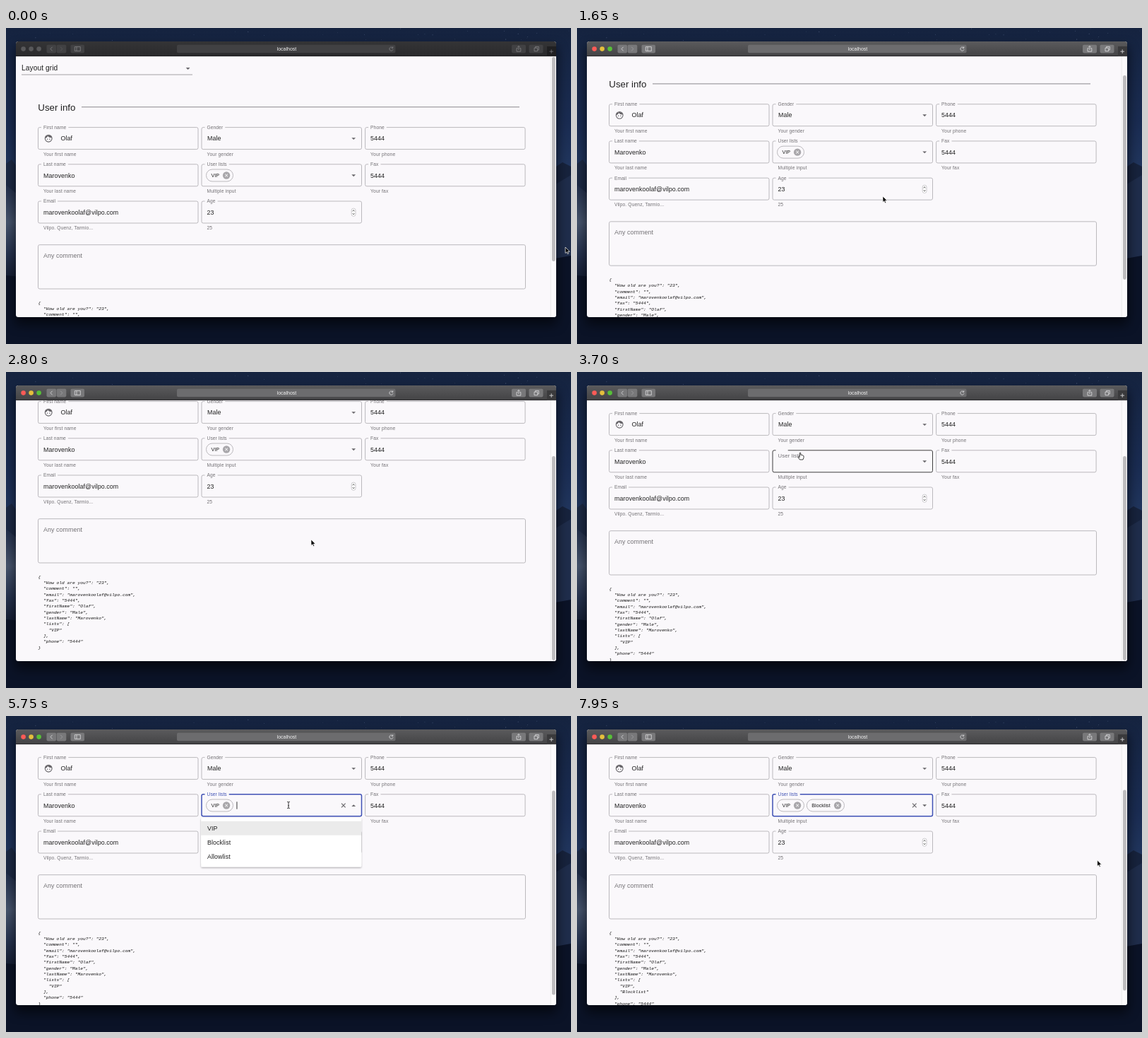
Animation, 800 px wide and 447 px high, one loop 8 s. Source, as an HTML page:

```html
<!DOCTYPE html>
<html lang="en">
<head>
<meta charset="utf-8">
<title>User info form</title>
<style>
html, body { margin: 0; width: 100%; height: 100%; overflow: hidden; background: #0d1730; }
svg { display: block; width: 100vw; height: 100vh; font-family: "Liberation Sans", Arial, sans-serif; }
text { white-space: pre; }
.val { font-size: 8.86px; letter-spacing: .083px; fill: #202020; }
.ph { font-size: 8.86px; letter-spacing: .083px; fill: #737175; }
.lab { font-size: 6.64px; letter-spacing: .1px; fill: #737175; }
.help { font-size: 6.64px; letter-spacing: .15px; fill: #737175; }
.chip { font-size: 7.2px; fill: #202020; }
.code { font: italic 6.23px "Liberation Mono", "Courier New", monospace; fill: #111; }
.box { fill: none; stroke: #b4b2b6; stroke-width: .9; }
.ico { fill: none; stroke: #d5d5d7; stroke-width: .9; }
</style>
</head>
<body>
<svg id="stage" viewBox="0 0 800 447">
  <defs>
    <linearGradient id="sky" x2="0" y2="1">
      <stop offset="0" stop-color="#15233f"/><stop offset=".3" stop-color="#1a2c52"/>
      <stop offset=".5" stop-color="#243a63"/><stop offset=".8" stop-color="#0f1830"/>
      <stop offset="1" stop-color="#0a1122"/>
    </linearGradient>
    <linearGradient id="dune" x2="0" y2="1">
      <stop offset="0" stop-color="#222f4b"/><stop offset=".35" stop-color="#48566f"/>
      <stop offset=".65" stop-color="#26334f"/><stop offset="1" stop-color="#0b1326"/>
    </linearGradient>
    <linearGradient id="barOff" x2="0" y2="1">
      <stop offset="0" stop-color="#343436"/><stop offset="1" stop-color="#2a2a2c"/>
    </linearGradient>
    <linearGradient id="barOn" x2="0" y2="1">
      <stop offset="0" stop-color="#5b5b5d"/><stop offset="1" stop-color="#434345"/>
    </linearGradient>
    <filter id="soft" x="-10%" y="-10%" width="120%" height="125%"><feGaussianBlur stdDeviation="8"/></filter>
    <filter id="lift" x="-10%" y="-10%" width="120%" height="130%">
      <feDropShadow dx="0" dy="1.2" stdDeviation="1.3" flood-opacity=".35"/>
    </filter>
    <clipPath id="win"><rect x="14" y="19" width="765" height="390" rx="3.5"/></clipPath>
    <clipPath id="view"><rect x="14" y="40" width="757" height="369"/></clipPath>
  </defs>

  <rect width="800" height="447" fill="url(#sky)"/>
  <g id="stars" fill="#8fa2c8"></g>
  <path d="M0 192L8 186 22 206V447H0Z" fill="#1d2a45"/>
  <path d="M0 222L22 240V372H0Z" fill="url(#dune)"/>
  <path d="M800 196L788 190 770 202V447H800Z" fill="#17233d"/>
  <path d="M770 226L800 208V330H770Z" fill="#1f2d4b"/>
  <path d="M0 350Q400 395 800 322V447H0Z" fill="#0b1327"/>
  <rect x="12" y="26" width="769" height="394" rx="6" fill="#000" opacity=".55" filter="url(#soft)"/>

  <g clip-path="url(#win)">
    <rect x="14" y="19" width="765" height="390" fill="#faf8fb"/>
    <g clip-path="url(#view)"><g id="page"></g></g>
    <rect x="771" y="40" width="8" height="369" fill="#fbfafb"/>
    <path d="M771.3 40V409" stroke="#e6e5e7" stroke-width=".7"/>
    <rect id="thumb" x="773" width="4.8" rx="2.4" fill="#bdbcbe"/>
    <rect id="bar" x="14" y="19" width="765" height="21"/>
    <path d="M14 39.7H779" stroke="#161617" stroke-width=".7"/>
    <rect id="addr" x="242" y="23.8" width="309.5" height="11.4" rx="2"/>
    <text x="397.5" y="32.2" text-anchor="middle" font-size="7" fill="#f1f1f1">localhost</text>
    <g id="lights"></g>
    <g id="tools"></g>
  </g>
  <g id="cursor"></g>
</svg>
<script>
const NS = "http://www.w3.org/2000/svg";
const $ = id => document.getElementById(id);
function add(parent, tag, attrs, text) {
  const e = document.createElementNS(NS, tag);
  for (const k in attrs) e.setAttribute(k, attrs[k]);
  if (text !== undefined) e.textContent = text;
  parent.appendChild(e);
  return e;
}
const set = (e, attrs) => { for (const k in attrs) e.setAttribute(k, attrs[k]); };
const show = (e, on) => e.setAttribute("display", on ? "inline" : "none");
const clamp = u => Math.max(0, Math.min(1, u));
const smooth = u => u * u * (3 - 2 * u);
const easeOut = u => 1 - (1 - u) ** 3;
const lerp = (a, b, u) => a + (b - a) * u;

// Event times in ms
const LOOP = 8000, FOCUS = 1350, CLEAR = 3660, CLEAR_JSON = 3750,
  OPEN1 = 4300, PICK1 = 5250, OPEN2 = 5750, PICK2 = 6300;
const BG = "#faf8fb", BLUE = "#3f51b5", VIEW = 367, LINE = 8.33;

// ---- window chrome
let seed = 7;
const rnd = () => (seed = seed * 16807 % 2147483647) / 2147483647;
for (let i = 0; i < 34; i++)
  add($("stars"), "circle", { cx: rnd() * 800, cy: rnd() * 18, r: .3 + rnd() * .3, opacity: .2 + rnd() * .4 });

const lights = ["#fc5b57", "#e5bf3c", "#57c038"].map((c, i) =>
  [add($("lights"), "circle", { cx: 24.6 + 11 * i, cy: 29.6, r: 3.3 }), c]);
const buttons = [[57.5, 13.6], [71.7, 13.6], [91.5, 19.5], [716, 20], [740.5, 20]].map(([x, width]) =>
  add($("tools"), "rect", { x, y: 23.8, width, height: 11.6, rx: 1.8 }));
const plusBox = add($("tools"), "rect", { x: 766, y: 26, width: 13, height: 14 });
const icons = add($("tools"), "g", {});
const ico = (d, extra) => add(icons, "path", { d, class: "ico", ...extra });
ico("M65.6 26.8L63 29.6L65.6 32.4");
ico("M77.2 26.8L79.8 29.6L77.2 32.4", { opacity: .4 });
ico("M97.3 26.6H105.3V32.6H97.3ZM100 26.6V32.6");
ico("M724.5 28.6H723V33.2H728.8V28.6H727.3M725.9 31V25.6M724.3 27L725.9 25.4L727.5 27", { "stroke-width": .8 });
ico("M748 28.2H752.6V32.8H748ZM749.6 28V26.4H754.3V31H752.8", { "stroke-width": .8 });
ico("M769.4 33.2H775M772.2 30.4V36");
ico("M547.6 28.1A2.6 2.6 0 1 0 548 30.3M547.8 26.3V28.4H545.7", { "stroke-width": .75 });

// ---- page, laid out at scroll 0
const page = $("page");
const text = (x, y, cls, s, parent = page) => add(parent, "text", { x, y, class: cls }, s);
const arrow = (x, y, parent = page) =>
  add(parent, "path", { d: "M-2.9 -1.4H2.9L0 1.5Z", fill: "#6a686c", transform: `translate(${x} ${y})` });

text(22, 60, "val", "Layout grid").style.fontSize = "10.2px";
arrow(257.6, 57.4);
add(page, "path", { d: "M22 66H264", stroke: "#8d8b8f", "stroke-width": .8 });
text(45.3, 116.6, "val", "User info").style.cssText = "font-size:13.27px;letter-spacing:0";
add(page, "path", { d: "M107 111.8H727", stroke: "#7d7b7f", "stroke-width": .9 });

const COLS = [45.5, 277, 508.6], W = 226.5, H = 31;
const rowY = r => 140.6 + 52.2 * r;
const fields = [];
function field(col, row, label, help, value, dx = 7.5) {
  const x = COLS[col], y = rowY(row);
  const rect = add(page, "rect", { x, y, width: W, height: H, rx: 2.2, class: "box" });
  const gap = add(page, "rect", { x: x + 4.5, y: y - 1.2, height: 2.6, fill: BG });
  const lab = text(0, 0, "lab", label);
  set(lab, { transform: `translate(${x + 7.5} ${y + 2.4})` });
  const gapW = lab.getComputedTextLength() + 6;
  set(gap, { width: gapW });
  text(x + 7.5, y + 40.2, "help", help);
  if (value) text(x + dx, y + 18.7, "val", value);
  const f = { x, y, w: W, h: H, rect, gap, gapW, lab };
  fields.push(f);
  return f;
}
field(0, 0, "First name", "Your first name", "Olaf", 32);
field(1, 0, "Gender", "Your gender", "Male", 8);
field(2, 0, "Phone", "Your phone", "5444");
field(0, 1, "Last name", "Your last name", "Marovenko");
const lists = field(1, 1, "User lists", "Multiple input", "");
field(2, 1, "Fax", "Your fax", "5444");
field(0, 2, "Email", "Vilpo. Quenz, Tarmio...", "marovenkoolaf@vilpo.com");
field(1, 2, "Age", "25", "23");
arrow(492.2, 156.6);

const face = add(page, "g", { transform: "translate(60.2 156.2)", fill: "#656367" });
add(face, "circle", { r: 4.9, fill: "none", stroke: "#656367", "stroke-width": 1.1 });
add(face, "path", { d: "M-4.9 -.2Q-2 -.9 -1 -3.2Q1 -.6 4.8 -1A5 5 0 0 0 -4.9 -.2Z" });
for (const cx of [-1.7, 1.7]) add(face, "circle", { cx, cy: 1, r: .75 });

add(page, "rect", { x: 489.2, y: 255.2, width: 5.8, height: 11, rx: 2.6, fill: "#fff", stroke: "#b8b6ba", "stroke-width": .7 });
add(page, "path", { d: "M490.7 259.3L492.1 257.5L493.5 259.3M490.7 262.1L492.1 263.9L493.5 262.1", fill: "none", stroke: "#444", "stroke-width": .8 });

fields.push({ x: 45.5, y: 306.7, w: 690, h: 62.3,
  rect: add(page, "rect", { x: 45.5, y: 306.7, width: 690, height: 62.3, rx: 2.2, class: "box" }) });
text(53, 325, "ph", "Any comment");

// ---- chips and list controls
const midY = rowY(1) + H / 2 + .2;
function chip(x, w, label) {
  const g = add(page, "g", {}), cx = x + w - 9.4;
  add(g, "rect", { x, y: midY - 8.5, width: w, height: 17, rx: 8.5, class: "box" });
  text(x + 7, midY + 2.6, "chip", label, g);
  add(g, "circle", { cx, cy: midY, r: 5.2, fill: "#a9a7ab" });
  add(g, "path", { d: `M${cx - 1.9} ${midY - 1.9}l3.8 3.8m0 -3.8l-3.8 3.8`, stroke: "#fff", "stroke-width": 1 });
  return g;
}
const chipA = chip(283.5, 38, "VIP"), chipB = chip(325.3, 53.2, "Blocklist");
const caret = add(page, "rect", { y: midY - 5.2, width: .9, height: 10.4, fill: "#222" });
const wipe = add(page, "path", { d: `M475 ${midY - 2.8}l5.6 5.6m0 -5.6l-5.6 5.6`, stroke: "#656367", "stroke-width": 1.1 });
const listArrow = arrow(492.2, midY + .2);

// ---- JSON preview
const code = Array.from({ length: 14 }, (_, i) => text(45.5, 390.8 + LINE * i, "code", ""));
function json(items) {
  const q = s => `"${s}"`;
  const rows = [["How old are you?", "23"], ["comment", ""], ["email", "marovenkoolaf@vilpo.com"], ["fax", "5444"],
    ["firstName", "Olaf"], ["gender", "Male"], ["lastName", "Marovenko"], ["lists", items], ["phone", "5444"]];
  return JSON.stringify(Object.fromEntries(rows), null, 2).split("\n");
}

// ---- dropdown
const menu = add(page, "g", {}), menuY = 144 + 82;
add(menu, "rect", { x: 276.2, y: menuY, width: 227, height: 69.4, rx: 1.5, fill: "#fff", filter: "url(#lift)" });
const options = ["VIP", "Blocklist", "Allowlist"].map((s, i) => {
  const y = menuY + 4.8 + 20 * i;
  const bg = add(menu, "rect", { x: 276.2, y, width: 227, height: 20 });
  text(285, y + 13, "val", s, menu);
  return { y, bg };
});

// ---- pointer
const cur = {
  arrow: ["M0 0V8.5L1.9 6.8L3.2 9.7L4.6 9.1L3.3 6.3H6.1Z", "#000", "#fff", .7],
  hand: ["M-.8 .6Q0 -.5 .8 .6V3.4L1.9 3.2L3 3.6L4.2 4L5 4.9V7.2L3.9 10H-.6L-2.9 6.8Q-3.3 5.6 -2.2 5.6L-.8 6.8Z", "#fff", "#111", .8],
  text: ["M-1.9 -4.7Q0 -4.7 0 -3.6Q0 -4.7 1.9 -4.7M0 -3.6V3.6M-1.9 4.7Q0 4.7 0 3.6Q0 4.7 1.9 4.7M-.9 .9H.9", "none", "#222", .9]
};
const pointer = add($("cursor"), "path", { "stroke-linejoin": "round" });
const path = [[0, 792, 310], [100, 792, 310], [1000, 504, 250.5], [1300, 433, 238], [1700, 433, 238], [1750, 432, 237],
  [2800, 432, 237], [3400, 316, 114], [3750, 316, 114], [4100, 345, 124], [4350, 345, 124], [4700, 325, 153.5],
  [5250, 325, 153.5], [5600, 400, 126], [5800, 400, 126], [6150, 318, 175], [6300, 318, 175], [6600, 358, 174],
  [7150, 358, 174], [7850, 736.7, 204], [LOOP, 736.7, 204]];
const kinds = [[0, "arrow"], [2820, "text"], [3200, "hand"], [3900, "text"], [4480, "hand"], [PICK1, "arrow"],
  [5425, "text"], [5920, "hand"], [PICK2, "text"], [7445, "arrow"]];
function pointerAt(t) {
  const i = path.findIndex(p => p[0] > t), a = path[i - 1], b = path[i];
  const u = smooth((t - a[0]) / (b[0] - a[0]));
  return [lerp(a[1], b[1], u), lerp(a[2], b[2], u)];
}

function scrollAt(t) {
  if (t >= CLEAR) return 82;
  return 33 * easeOut(clamp((t - 1400) / 300)) + 66 * smooth(clamp((t - 2150) / 600));
}

let lastItems = "";
function draw(t) {
  const on = t >= FOCUS, scroll = scrollAt(t);
  set($("bar"), { fill: on ? "url(#barOn)" : "url(#barOff)" });
  set($("addr"), { fill: on ? "#6c6c6e" : "#414143" });
  lights.forEach(([e, c]) => set(e, { fill: on ? c : "#58585a" }));
  buttons.forEach(b => set(b, { fill: on ? "#78787a" : "#414143" }));
  set(plusBox, { fill: on ? "#3a3a3c" : "#1f1f21" });
  set(icons, { opacity: on ? 1 : .4 });
  set(page, { transform: `translate(0 ${-scroll})` });

  const focus = t >= OPEN1;
  const open = focus && t < PICK1 || t >= OPEN2 && t < PICK2;
  const hasA = t < CLEAR || t >= PICK1, hasB = t >= PICK2;
  const [px, py] = pointerAt(t), y = py + scroll;

  // JSON and scrollbar follow the cleared chip a moment later
  const inJson = t < CLEAR_JSON || t >= PICK1;
  const items = [inJson && "VIP", hasB && "Blocklist"].filter(Boolean);
  const lines = json(items);
  if (lines.join() !== lastItems) {
    lastItems = lines.join();
    code.forEach((e, i) => { e.textContent = lines[i] || ""; });
  }
  const height = 466 + (lines.length - 13) * LINE;
  const barScroll = t < CLEAR_JSON ? scrollAt(Math.min(t, CLEAR - 1)) : scroll;
  set($("thumb"), { y: 41 + barScroll / height * VIEW, height: VIEW * VIEW / height });

  const inMenu = open && y > menuY && y < menuY + 69;
  for (const f of fields) {
    const hover = t > 2820 && !inMenu && px > f.x && px < f.x + f.w && y > f.y && y < f.y + f.h;
    const active = f === lists && focus;
    set(f.rect, { style: active ? `stroke:${BLUE};stroke-width:1.5` : hover ? "stroke:#2a2a2a" : "" });
  }

  // Floating label drops when the list is empty and rises on focus
  const k = focus ? 1 - easeOut(clamp((t - OPEN1) / 200)) : easeOut(clamp((t - CLEAR) / 200));
  set(lists.lab, {
    transform: `translate(${lists.x + 7.5} ${lerp(lists.y + 2.4, lists.y + 18.7, k)}) scale(${lerp(1, 4 / 3, k)})`,
    style: focus ? `fill:${BLUE}` : ""
  });
  set(lists.gap, { width: lists.gapW * (1 - k) });

  show(chipA, hasA);
  show(chipB, hasB);
  show(wipe, focus && hasA);
  const since = hasB ? PICK2 : t >= OPEN2 ? OPEN2 : t >= PICK1 ? PICK1 : OPEN1;
  show(caret, focus && Math.floor((t - since) / 500) % 2 === 0);
  set(caret, { x: hasB ? 382 : hasA ? 326.5 : 285.5 });
  set(listArrow, { transform: `translate(492.2 ${midY + .2}) scale(1 ${open ? -1 : 1})` });

  show(menu, open);
  options.forEach((o, i) => {
    const hover = y >= o.y && y < o.y + 20;
    set(o.bg, { fill: i === 0 && hasA ? "#ebebeb" : hover ? "#f4f4f4" : "#fff" });
  });

  const [d, fill, stroke, width] = cur[kinds.filter(c => c[0] <= t).pop()[1]];
  set(pointer, { d, fill, stroke, "stroke-width": width, transform: `translate(${px} ${py})` });
}

const start = performance.now();
function tick(now) {
  draw(Math.max(0, now - start) % LOOP);
  requestAnimationFrame(tick);
}
draw(0);
requestAnimationFrame(tick);
</script>
</body>
</html>
```
